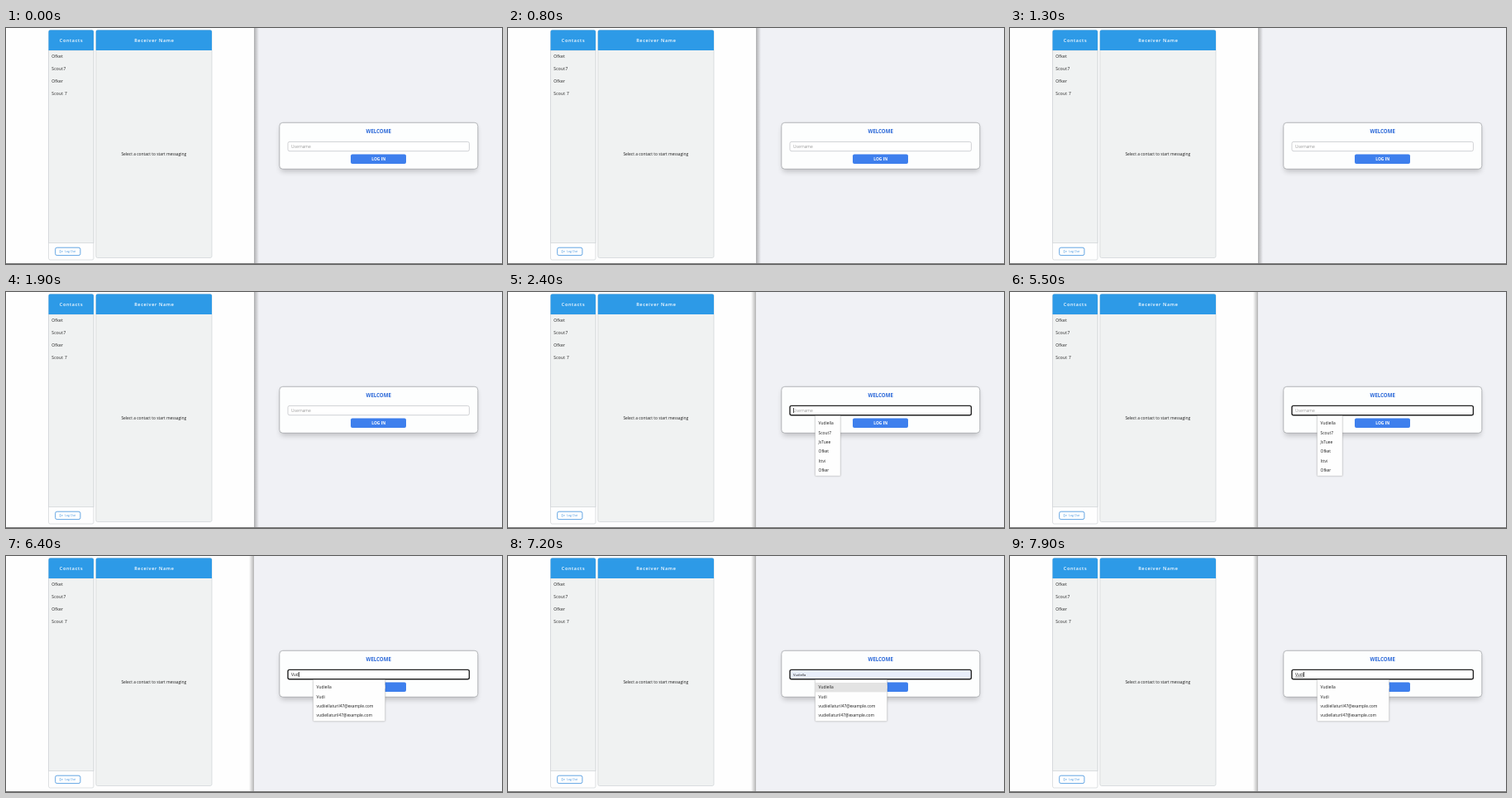
Recreate the animation shown at these times as an HTML page. Size 600x285 px, loop 8000 ms.

```html
<!DOCTYPE html>
<html lang="en">
<head>
<meta charset="utf-8">
<style>
html, body { margin: 0; width: 100%; height: 100%; overflow: hidden; }
svg { display: block; width: 600px; height: 285px; }
text { font: 4.9px "Open Sans", "Noto Sans", sans-serif; fill: #1c1c1c; white-space: pre; }
.mid { text-anchor: middle; }
.head { font-size: 5.5px; font-weight: 600; letter-spacing: .65px; fill: #fff; }
.row { letter-spacing: .3px; }
</style>
</head>
<body>
<svg viewBox="0 0 600 285">
  <defs>
    <linearGradient id="fade"><stop offset="0" stop-color="#777" stop-opacity=".55"/><stop offset="1" stop-color="#777" stop-opacity="0"/></linearGradient>
    <filter id="soft" x="-10%" y="-30%" width="120%" height="170%"><feGaussianBlur stdDeviation="3"/></filter>
    <filter id="thin" x="-10%" y="-10%" width="120%" height="120%"><feGaussianBlur stdDeviation=".8"/></filter>
  </defs>
  <rect width="300" height="285" fill="#fefefe"/>
  <rect x="300" width="300" height="285" fill="#f0f1f5"/>
  <rect id="shade" x="300" width="6" height="285" fill="url(#fade)"/>
  <rect y="284" width="600" height="1" fill="#777"/>

  <g stroke="#cfd3d6" stroke-width=".7">
    <rect x="51.5" y="2.5" width="54.5" height="277.5" rx="2" fill="#fefefe"/>
    <path d="M51.5 27H106V259.5H51.5Z" fill="#f0f2f2"/>
    <rect x="108.8" y="2.5" width="140.2" height="275" rx="2" fill="#f0f2f2"/>
  </g>
  <path d="M51.5 27V4.5q0-2 2-2H104q2 0 2 2V27ZM108.8 27V4.5q0-2 2-2H247q2 0 2 2V27Z" fill="#2d9ae7"/>
  <text class="head mid" x="79" y="16.8">Contacts</text>
  <text class="head mid" x="179.4" y="16.8">Receiver Name</text>
  <g id="contacts"></g>
  <text class="mid" x="178.8" y="154.2">Select a contact to start messaging</text>
  <rect x="59.7" y="265.2" width="30.2" height="9.4" rx="2" fill="#fff" stroke="#3b8fdc" stroke-width=".8"/>
  <path d="M66.3 268.4H65.2V271.4H66.3M66.3 269.9H68.4M67.5 269L68.4 269.9L67.5 270.8" fill="none" stroke="#3b8fdc" stroke-width=".45"/>
  <text x="71.2" y="271.1" style="font-size:3.5px;fill:#3b8fdc">Log Out</text>

  <rect x="332" y="118" width="237.5" height="55.5" rx="4" fill="#000" opacity=".2" filter="url(#soft)"/>
  <rect x="330.8" y="114.3" width="240" height="56" rx="4" fill="#fdfefe" stroke="#a4a6aa" stroke-width=".8"/>
  <text class="mid" x="450.7" y="127.3" style="font-size:6.1px;font-weight:700;fill:#2866d8">WELCOME</text>
  <rect id="field" x="341" y="137.4" width="219.4" height="11.3" rx="2"/>
  <text id="value" x="345" y="144.8"></text>
  <rect id="caret" y="140" width=".8" height="6" fill="#222"/>
  <rect x="417" y="152.6" width="67" height="11.3" rx="2" fill="#3e7fed"/>
  <text class="mid" x="450.8" y="160.1" style="font-weight:700;fill:#fff">LOG IN</text>
  <g id="shortList"></g>
  <g id="longList"></g>
</svg>
<script>
const $ = id => document.getElementById(id);
const set = (el, attrs) => { for (const k in attrs) el.setAttribute(k, attrs[k]); };
const show = (el, on) => el.style.display = on ? '' : 'none';

$('contacts').innerHTML = ['Ofket', 'Scout7', 'Ofker', 'Scout 7']
  .map((name, i) => `<text class="row" x="55.2" y="${35.9 + 15 * i}">${name}</text>`).join('');

function buildList(el, width, names) {
  const box = `x="371.8" y="149.8" width="${width}" height="${names.length * 11.3 + 4.4}"`;
  el.innerHTML = `<rect ${box} fill="#000" opacity=".3" filter="url(#thin)"/>
    <rect ${box} fill="#fefefe" stroke="#d4d4d4" stroke-width=".5"/>
    <rect class="hover" x="371.8" y="153" width="${width}" height="11.4" fill="#e3e3e3"/>` +
    names.map((name, i) => `<text x="375.6" y="${160.4 + 11.3 * i}">${name}</text>`).join('');
}
buildList($('shortList'), 30.2, ['Vudiella', 'Scout7', 'JsTuee', 'Ofket', 'Ittvi', 'Ofker']);
buildList($('longList'), 86.6, ['Vudiella', 'Vudi', 'vudiiellaturil47@example.com', 'vudiellaturil47@example.com']);
show($('shortList').querySelector('.hover'), false);
const hover = $('longList').querySelector('.hover');

const keys = [6200, 6300, 6400, 6600];
const blinks = [2400, 3100, 3700, 4300, 4900, 5500, 6100, 7200, 7600];

function draw(t) {
  const focused = t >= 2400;
  const preview = t >= 7200 && t < 7400;
  const typed = 'Vudi'.slice(0, keys.filter(k => t >= k).length);
  const value = $('value');

  // The focused window casts its shadow on the other one.
  set($('shade'), { transform: focused ? 'translate(600 0) scale(-1 1)' : '' });
  set($('field'), {
    fill: preview ? '#e8eefa' : '#fff',
    stroke: focused ? '#222' : '#c4c6c9',
    'stroke-width': focused ? 1.4 : .8
  });

  value.textContent = preview ? 'Vudiella' : typed || 'Username';
  value.style.fontSize = preview ? '4.2px' : '';
  value.style.fill = typed ? '#1c1c1c' : '#999';
  value.style.textDecoration = t >= 7600 ? 'underline' : '';

  const caretOn = blinks.filter(b => t >= b).length % 2 === 1;
  show($('caret'), caretOn);
  set($('caret'), { x: 345 + (typed ? value.getComputedTextLength() : 0) });

  show($('shortList'), focused && !typed);
  show($('longList'), typed);
  show(hover, preview);
}

const start = performance.now();
function tick() {
  draw((performance.now() - start) % 8000);
  requestAnimationFrame(tick);
}
tick();
</script>
</body>
</html>
```
